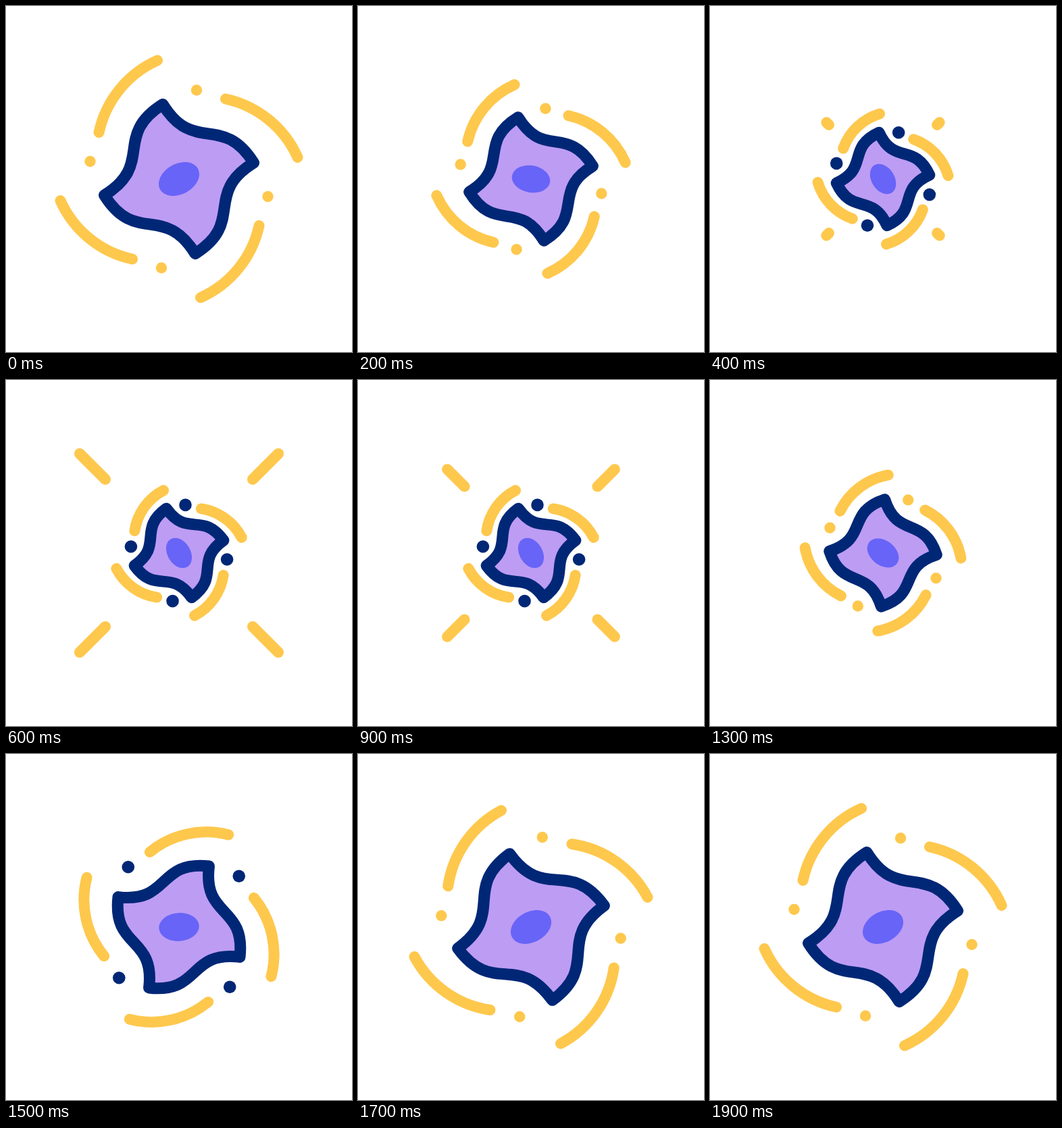
Write an HTML page that moves like this. It is 512 by 512 pixels and loops after 2000 ms.

```html
<!DOCTYPE html>
<html lang="en">
<head>
<meta charset="utf-8">
<title>Spinning cell</title>
<style>
  html, body { margin: 0; width: 100%; height: 100%; overflow: hidden; background: #fff; }
  svg { display: block; width: 100%; height: 100%; }
</style>
</head>
<body>
<svg viewBox="0 0 512 512">
  <g id="stage" transform="translate(256 256)" fill="none" stroke-linecap="round" stroke-linejoin="round"></g>
</svg>
<script>
const LOOP = 2000, STEP = 100;
const NAVY = '#002776', LILAC = '#bd9cf4', VIOLET = '#6864f7', YELLOW = '#fec84d';
const stage = document.getElementById('stage');

function add(tag, attrs) {
  const el = document.createElementNS('http://www.w3.org/2000/svg', tag);
  set(el, attrs);
  return stage.appendChild(el);
}

function set(el, attrs) {
  for (const name in attrs) el.setAttribute(name, attrs[name]);
}

// Every outer part repeats in four quarter turns.
const quarters = make => [0, 1, 2, 3].map(make);
const turn = ([x, y], q) => q ? turn([-y, x], q - 1) : [x, y];

const rays = quarters(() => add('path', { stroke: YELLOW, 'stroke-width': 16 }));
const arcs = add('path', { stroke: YELLOW, 'stroke-width': 16 });
const body = add('path', { fill: LILAC, stroke: NAVY, 'stroke-width': 17 });
const nucleus = add('ellipse', { fill: VIOLET });
const dots = quarters(() => add('circle', {}));

// Progress from 0 to 1 with a sine ease at both ends.
function ease(t, from, to) {
  const x = Math.min(1, Math.max(0, (t - from) / (to - from)));
  return (1 - Math.cos(Math.PI * x)) / 2;
}

// Rotates and scales a point, so line weights stay constant.
function placer(scale, degrees) {
  const a = degrees * Math.PI / 180;
  const c = Math.cos(a) * scale, s = Math.sin(a) * scale;
  return ([x, y], q = 0) => {
    const [u, v] = turn([x, y], q);
    return [u * c - v * s, u * s + v * c];
  };
}

const str = p => p.map(n => n.toFixed(2)).join(' ');

function bodyPath(put) {
  const curve = q => 'C' + [[22, -36], [64, -98], [110.5, -24]].map(p => str(put(p, q))).join(' ');
  return 'M' + str(put([-24, -110.5])) + quarters((_, q) => curve(q)).join('') + 'Z';
}

function arcPath(put, scale) {
  const r = (152 * scale).toFixed(2);
  return quarters((_, q) =>
    `M${str(put([-118.5, -69], q))}A${r} ${r} 0 0 1 ${str(put([-32, -175.5], q))}`).join('');
}

function dotsAreNavy(t) {
  return (t >= 350 && t < 1250) || (t >= 1400 && t < 1650);
}

function draw(t) {
  const k = ease(t, 0, 432) - ease(t, 1090.7, 1728.4);
  const spin = -813.6 * k;
  const ringScale = 1 - 0.465 * k;
  const ring = placer(ringScale, spin);

  set(arcs, { d: arcPath(ring, ringScale) });
  set(body, { d: bodyPath(placer(1 - 0.395 * k, spin)) });

  const size = 1 - 0.25 * k;
  set(nucleus, { rx: 32 * size, ry: 22.5 * size, transform: `rotate(${-29 + 88 * k})` });

  const navy = dotsAreNavy(t);
  dots.forEach((dot, q) => {
    const [cx, cy] = ring([26, -131.5], q);
    set(dot, { cx, cy, r: navy ? 9.3 : 8.2, fill: navy ? NAVY : YELLOW });
  });

  const reach = ease(t, 350, 600) - ease(t, 700, 1213);
  const near = 77 + 32 * reach, far = 77 + 70 * reach;
  rays.forEach((ray, q) => set(ray, {
    d: `M${str(turn([near, near], q))}L${str(turn([far, far], q))}`,
    visibility: reach > 0.02 ? 'visible' : 'hidden'
  }));
}

// The motion plays at ten poses a second; the small lead absorbs clock jitter.
const start = performance.now() - 4;
function tick() {
  const step = Math.floor((performance.now() - start) / STEP);
  draw(step * STEP % LOOP);
  requestAnimationFrame(tick);
}
tick();
</script>
</body>
</html>
```
